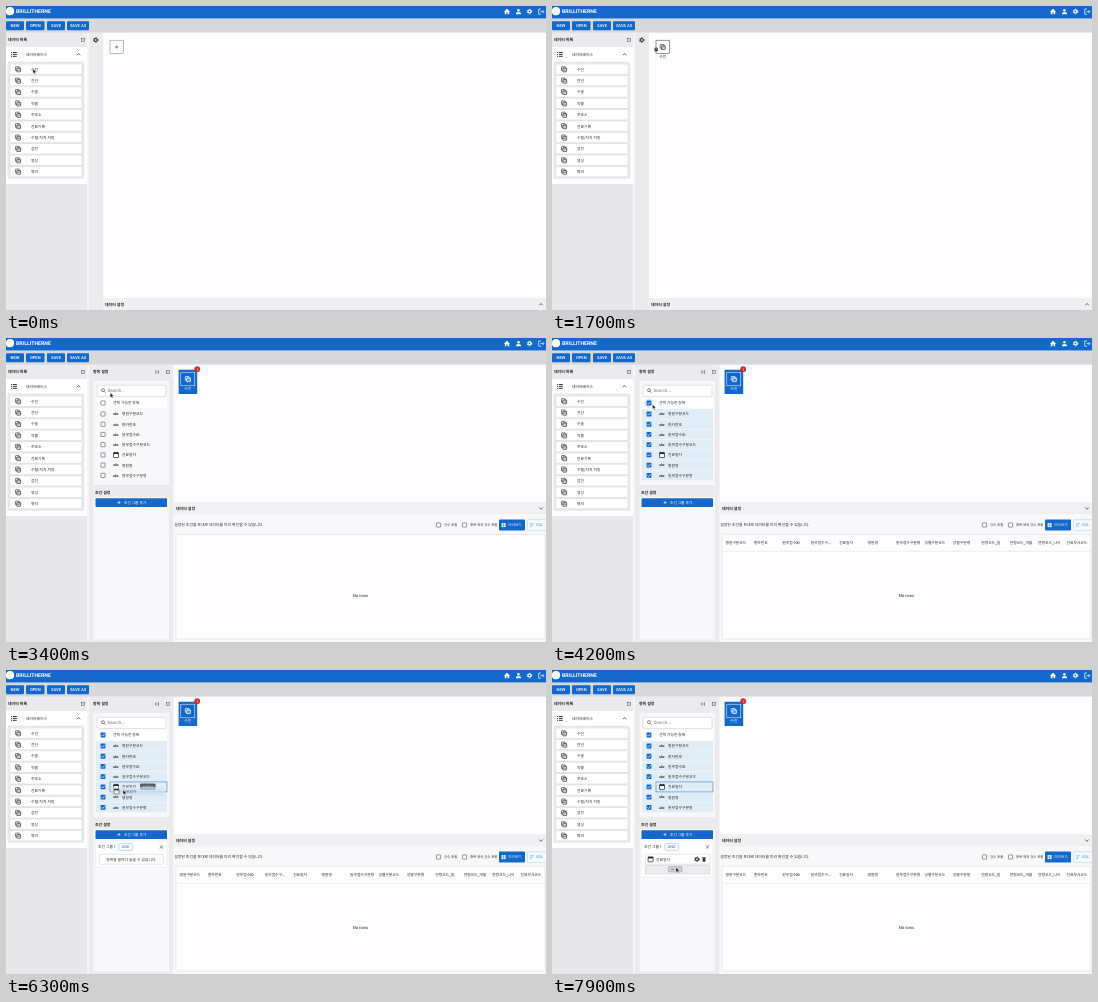
An HTML page that plays this animation: 540x304 px, repeating every 8000 ms.

```html
<!DOCTYPE html>
<html lang="ko">
<head>
<meta charset="utf-8">
<style>
html, body { margin: 0; width: 100%; height: 100%; overflow: hidden; background: #fdfcfe; }
svg { display: block; width: 100%; height: 100%; }
text { font-family: Roboto, "Noto Sans CJK KR", "Noto Sans CJK", sans-serif; text-rendering: geometricPrecision; white-space: pre; }
</style>
</head>
<body>
<svg id="stage" viewBox="0 0 540 304"></svg>
<script>
const BLUE = '#1468cc', INK = '#2b2b2e', GRAY = '#ebebed', PALE = '#e1edf6', WHITE = '#fdfcfe';
const LOOP = 8000;

// Drawing helpers
const box = (x, y, w, h, fill, line = 'none', r = 0, sw = .5) =>
  `<rect x="${x}" y="${y}" width="${w}" height="${h}" rx="${r}" fill="${fill}" stroke="${line}" stroke-width="${sw}"/>`;
const dot = (x, y, r, fill) => `<circle cx="${x}" cy="${y}" r="${r}" fill="${fill}"/>`;
const stroke = (d, color = INK, w = .7) =>
  `<path d="${d}" fill="none" stroke="${color}" stroke-width="${w}"/>`;
const label = (x, y, s, size = 3.8, fill = INK, weight = 400, anchor = 'start') =>
  `<text x="${x}" y="${y + size * .37}" font-size="${size}" fill="${fill}" font-weight="${weight}" text-anchor="${anchor}">${s}</text>`;
const title = (x, y, s) => label(x, y, s, 3.95, '#222', 700);
const group = (id, body, hidden) => `<g id="${id}"${hidden ? ' display="none"' : ''}>${body}</g>`;

// Icons, centred on x, y
const stack = (x, y, c = '#444', bg = '#fff') =>
  box(x - 2.5, y - 2.5, 3.8, 3.8, bg, c, .4, .7) + box(x - 1.2, y - 1.2, 3.8, 3.8, bg, c, .4, .8) +
  stroke(`M${x - 1} ${y - .4}h3.4M${x - 1} ${y + 1}h3.4`, c, .5);
const gear = (x, y, c, hole) =>
  `<circle cx="${x}" cy="${y}" r="2.3" fill="none" stroke="${c}" stroke-width="1" stroke-dasharray="1.2 1.2"/>` +
  dot(x, y, 2, c) + dot(x, y, .9, hole);
const chevron = (x, y, up) => stroke(`M${x - 1.7} ${y + up * .9}l1.7 ${-up * 1.8}l1.7 ${up * 1.8}`, INK, .7);
const plus = (x, y, r, c, w = .6) => stroke(`M${x - r} ${y}h${2 * r}M${x} ${y - r}v${2 * r}`, c, w);
const cross = (x, y, r) => stroke(`M${x - r} ${y - r}l${2 * r} ${2 * r}m0 ${-2 * r}l${-2 * r} ${2 * r}`, '#444', .6);
const expand = (x, y) =>
  box(x - 1.6, y - 1.6, 3.2, 3.2, 'none', '#666', 0, .6) + box(x - .5, y - .5, 1, 1, '#aaa');
const calendar = (x, y) =>
  box(x - 2.5, y - 2.2, 5, 4.8, '#fff', '#222', .4, .7) + box(x - 2.5, y - 2.4, 5, 1.5, '#222') +
  stroke(`M${x - 1.5} ${y - 3.1}v1M${x + 1.5} ${y - 3.1}v1`, '#222', .6);
const trash = (x, y) => box(x - 1.4, y - 1.2, 2.8, 3.7, '#333', 'none', .4) + box(x - 1.9, y - 2.3, 3.8, .7, '#333');
const check = (x, y, on, s = 4.2) => on
  ? box(x - 2.4, y - 2.4, 4.8, 4.8, BLUE, 'none', .6) + stroke(`M${x - 1.5} ${y}l1.1 1.1l2-2.2`, '#fff', .7)
  : box(x - s / 2, y - s / 2, s, s, 'none', '#555', .5, .6);

const SOURCES = ['수진', '진단', '수술', '약물', '주호소', '진료기록', '수혈/처치 처방', '검진', '영상', '병리'];
const FIELDS = ['병원구분코드', '환자번호', '원무접수ID', '원무접수구분코드', '진료일자', '병원명', '원무접수구분명'];
const COLUMNS = ['병원구분코드', '환자번호', '원무접수ID', '원무접수구…', '진료일자', '병원명', '원무접수구분명',
  '성별구분코드', '성별구분명', '연령코드_일', '연령코드_개월', '연령코드_나이', '진료부서코드'];
const fieldY = i => 76 + i * 10.23;
const DATE_Y = fieldY(4);

function header() {
  const tools = [['NEW', 0, 18], ['OPEN', 20, 18.5], ['SAVE', 41, 18], ['SAVE AS', 61, 22]];
  return box(0, 0, 540, 12.7, BLUE) + dot(4, 5.2, 4.1, '#fff') +
    label(10, 5.4, 'BRILLITHERNE', 5.2, '#fff', 700) +
    `<path d="M501 2.8l3.2 2.9h-1v2.6h-1.6v-1.9h-1.2v1.9h-1.6V5.700h-1z" fill="#fff"/>` +
    dot(512.5, 4.2, 1.3, '#fff') + `<path d="M509.900 8.200q0-2.300 2.600-2.300t2.600 2.300z" fill="#fff"/>` +
    gear(523.5, 5.5, '#fff', BLUE) +
    stroke('M535 3h-2.300v5.200h2.300M534.500 5.600h3.300m-1.300-1.500l1.500 1.500l-1.500 1.500', '#fff', .7) +
    box(0, 12.7, 540, 13.9, '#d8d8da') +
    tools.map(([s, x, w]) => box(x, 15.2, w, 9, BLUE, 'none', 1) +
      label(x + w / 2, 19.7, s, 4.1, '#fff', 500, 'middle')).join('');
}

function sidebar() {
  return box(0, 26.6, 83, 278, '#e8e8eb') + box(81, 26.6, 2, 278, '#f5f5f7') +
    box(0, 26.6, 81, 14.4, GRAY) + title(2, 33.7, '데이터 목록') + expand(77, 34) +
    box(0, 41, 81, 137, '#fff') +
    stroke('M5 46.500h1m.8 0h4M5 48.400h1m.8 0h4M5 50.300h1m.8 0h4', '#222', .9) +
    label(20, 48.4, '데이터베이스') + chevron(72.5, 48.4, 1) +
    box(2, 56.2, 75.6, 116, '#f1f1f3', '#c9c9cc', .5) +
    SOURCES.map((s, i) => {
      const y = 63.2 + i * 11.38;
      return box(3.8, y - 5.2, 72.2, 10.4, '#fff', '#cfcfd2', .4) + stack(12, y) + label(25, y, s);
    }).join('');
}

function fieldRows(on) {
  return check(97, 65, on) + FIELDS.map((s, i) => {
    const y = fieldY(i);
    return (on ? box(90, y - 4.9, 71, 9.8, PALE) : '') + check(97, y, on) +
      (i === 4 ? calendar(110, y) : label(107, y, 'abc', 3.5, '#333', 700)) + label(116, y, s);
  }).join('');
}

function settings() {
  return box(83, 26.6, 85, 278, GRAY) + group('shut', gear(89.7, 34, '#333', GRAY)) +
    group('open',
      title(87, 33.7, '항목 설정') + expand(162, 34) +
      stroke('M149.800 32.200v3.600M152.500 32.200v3.600M151.900 34h-1.500', '#555', .6) +
      box(87.5, 43, 75.5, 104, '#f8f8fa') +
      box(91, 47.2, 69, 11.2, '#fff', '#c4c4c8', 1.4) +
      `<circle cx="97" cy="52.200" r="1.500" fill="none" stroke="#555" stroke-width=".7"/>` + stroke('M98.100 53.300l1.500 1.500', '#555') +
      label(101.5, 52.8, 'Search...', 4.5, '#777') +
      box(90, 60, 71, 10.5, '#fff') + group('halo', dot(97, 65, 5, '#e4edf6'), 1) +
      group('off', fieldRows(false)) + group('on', fieldRows(true), 1) +
      label(107, 65, '선택 가능한 항목') +
      group('focus', box(104, DATE_Y - 5, 57, 10, 'none', '#3b7fc9', 0, .6), 1) +
      group('tip', box(134, 113.6, 15.6, 6.5, '#555b63', 'none', 1) + label(141.8, 116.9, '진료일자', 2.9, '#fff', 400, 'middle'), 1) +
      title(89, 155, '조건 설정') + box(87.5, 159, 75.5, 142.5, '#f8f8fa') +
      box(89.5, 160.2, 71.5, 8.8, BLUE, 'none', .8) +
      group('hover', box(89.5, 160.2, 71.5, 8.8, '#1157ac', 'none', .8), 1) +
      `<clipPath id="btn">${box(89.5, 160.2, 71.5, 8.8, '#000', 'none', .8)}</clipPath>` +
      `<g clip-path="url(#btn)"><circle id="ripple" cx="113" cy="166" r="0" fill="#fff"/></g>` +
      plus(113, 164.5, 1.5, '#fff') + label(118, 164.6, '조건 그룹 추가', 3.7, '#fff', 500) +
      group('cond', condition(), 1), 1);
}

function condition() {
  return group('card', box(89.5, 171, 71.5, 26, '#fff', '#e6e6e9', .6)) +
    group('tall', box(89.5, 171, 71.5, 36, '#fff', '#e6e6e9', .6), 1) +
    label(92, 177, '조건 그룹 1') +
    box(113, 173.6, 13.5, 6.7, '#fff', '#7fb0e6', .8) + label(119.7, 177, 'AND', 3.8, BLUE, 400, 'middle') +
    cross(155.4, 177, 1.7) +
    group('hint', box(93.3, 184.2, 64, 10, '#fff', '#c9c9cc', .5) +
      label(125.3, 189.2, '항목을 끌어다 놓을 수 있습니다.', 3.8, INK, 400, 'middle')) +
    group('item', box(93.3, 184.2, 64.5, 10, '#fff', '#c9c9cc', .5) + calendar(98.6, 189.3) +
      label(104, 189.3, '진료일자') + gear(145, 189.3, '#333', '#fff') + trash(152, 189.3) +
      box(93.3, 195.4, 64.5, 8.6, '#ececee', '#c4c4c8', .5) +
      box(116.5, 196.8, 13.5, 5, '#d2d2d4', '#8d8d90', .6) + stroke('M119 199.500h3', '#666', .6), 1);
}

// The workspace sits at its final place and slides in from the left.
function workspace() {
  const tableHead = COLUMNS.map((s, i) => label(173.5 + i * 28.42, 204.4, s, 3.75, INK, 500)).join('');
  return box(167.5, 26.6, 460, 278, WHITE) +
    group('empty', box(174.5, 34.2, 13.4, 13.4, '#fff', '#777') + plus(181.2, 41, 1.7, '#444')) +
    group('placed', box(174.5, 34.2, 13.4, 13.4, '#fff', '#333') + stack(181.2, 41) +
      label(181.2, 50.8, '수진', 3.8, INK, 400, 'middle'), 1) +
    group('picked', box(172.6, 31.8, 18.6, 24.2, BLUE, 'none', .6) +
      box(174.8, 34.2, 14, 13.6, 'none', '#fff') + stack(181.8, 41, '#fff', BLUE) +
      label(181.8, 51, '수진', 3.8, '#fff', 400, 'middle') +
      dot(191.2, 31.2, 2.9, '#d32f2f') + label(191.2, 31.2, '!', 3.6, '#fff', 700, 'middle'), 1) +
    group('add', dot(181.8, 60, 2.8, BLUE) + plus(181.8, 60, 1.3, '#fff'), 1) +
    group('bar', box(167.5, 292, 460, 12, '#f0f0f2') + title(169.5, 298.3, '데이터 설정') + chevron(605.5, 298.3, 1)) +
    group('data',
      box(167.5, 164.5, 376, 140, '#f8f8fa') + box(167.5, 164.5, 376, 11.8, '#f0f0f2') +
      title(170, 170.4, '데이터 설정') + chevron(535, 170.4, -1) +
      label(168.3, 187, '설정된 조건을 토대로 데이터를 미리 확인할 수 있습니다.', 3.85) +
      check(432.5, 187, false) + label(438, 187, '건수 포함', 3.4) +
      check(458.5, 187, false) + label(464, 187, '중복 제외 건수 포함', 3.4) +
      box(493, 181.6, 26, 10.9, BLUE, 'none', .9) + box(495.6, 185.1, 4, 4, '#fff') +
      stroke('M495.600 187.100h4M497.600 185.100v4', BLUE, .5) + label(502.3, 187, '미리보기', 3.6, '#fff', 500) +
      box(521.4, 181.6, 20, 10.9, '#f4f9fe', '#a9cdf0', .9) +
      stroke('M524 185.700h4M524 187.200h3M524 188.700h2', '#6ba9e6', .6) + label(530, 187, 'SQL', 3.9, '#6ba9e6', 500) +
      box(170, 196.3, 369, 104.7, WHITE, '#d8d8dc', .6) +
      group('heads', tableHead + stroke('M170 213.300h369', '#dedee2', .5), 1) +
      group('none', label(354.5, 257, 'No rows', 4.2, INK, 400, 'middle'), 1) +
      `<rect id="cover" x="167" width="460" height="130" fill="${WHITE}"/>`, 1);
}

const stage = document.getElementById('stage');
stage.innerHTML = settings() + group('main', workspace()) + sidebar() + header() +
  group('drag1', box(3.8, 58, 72.2, 10.4, '#fff', '#cfcfd2', .4) + stack(12, 63.2) + label(25, 63.2, '수진'), 1) +
  group('drag2', box(104, DATE_Y - 4.5, 54, 9, '#cfe2f3') + calendar(110, DATE_Y) + label(116, DATE_Y, '진료일자'), 1) +
  group('cursor', group('arrow', '<path d="M0 0v4.600l1.100-1l.8 1.700l.8-.4l-.8-1.600h1.500z" fill="#111" stroke="#fff" stroke-width=".35"/>') +
    group('hand', box(-1.3, -1.2, 3, 3.4, '#444', '#222', 1.2, .4) + stroke('M-.4-1v1.500M.6-1v1.500', '#ddd', .3), 1));

const el = {};
for (const n of stage.querySelectorAll('[id]')) el[n.id] = n;

// time, x, y
const PATH = [[0, 27, 63], [500, 27, 63], [1300, 106, 43], [1500, 104, 43], [2000, 104, 43], [2400, 108, 43],
  [3000, 108, 43], [3800, 100.5, 66.5], [4250, 100.5, 66.5], [4750, 113, 166], [5550, 113, 166],
  [6050, 116.5, 115.5], [6200, 116.5, 115.5], [6850, 125, 184.3], [7300, 125, 185], [7700, 124, 197.5], [8000, 124, 197.5]];

// id, from, to
const SPANS = [['empty', 0, 1500], ['placed', 1500, 2500], ['picked', 2500, LOOP], ['add', 2400, 3100],
  ['shut', 0, 2600], ['open', 2600, LOOP], ['bar', 0, 2600], ['data', 2600, LOOP], ['none', 2900, LOOP],
  ['off', 0, 4000], ['on', 4000, LOOP], ['halo', 3700, 4300], ['heads', 4100, LOOP],
  ['hover', 4700, 5700], ['cond', 5400, LOOP], ['card', 0, 7300], ['tall', 7300, LOOP],
  ['hint', 0, 7300], ['item', 7300, LOOP], ['focus', 6150, LOOP], ['tip', 6050, 7300],
  ['drag1', 600, 1500], ['drag2', 6250, 7300], ['hand', 1500, 2200]];

const ramp = (t, a, b) => Math.min(1, Math.max(0, (t - a) / (b - a)));
const ease = k => k * k * (3 - 2 * k);
const move = (n, x, y) => n.setAttribute('transform', `translate(${x} ${y})`);

function pointer(t) {
  const i = PATH.findIndex(p => p[0] > t);
  const [t0, x0, y0] = PATH[i - 1], [t1, x1, y1] = PATH[i];
  const k = ease(ramp(t, t0, t1));
  return [x0 + (x1 - x0) * k, y0 + (y1 - y0) * k];
}

function draw(t) {
  for (const [id, a, b] of SPANS) el[id].setAttribute('display', t >= a && t < b ? 'inline' : 'none');
  el.arrow.setAttribute('display', t >= 1500 && t < 2200 ? 'none' : 'inline');

  const [x, y] = pointer(t);
  move(el.cursor, x, y);
  move(el.drag1, x - 27, y - 63);
  move(el.drag2, x - 116.5, y - 115.5);
  el.drag1.setAttribute('opacity', .65);
  el.drag2.setAttribute('opacity', .7);

  const p = ease(ramp(t, 2610, 2800));
  move(el.main, -70.5 * (1 - p), 0);
  el.cover.setAttribute('y', 180 + 125 * p);

  el.ripple.setAttribute('r', t < 5350 ? 0 : 75 * ramp(t, 5350, 5750));
  el.ripple.setAttribute('opacity', .22 * (1 - ramp(t, 5550, 5900)));
}

function tick() {
  draw(performance.now() % LOOP);
  requestAnimationFrame(tick);
}
tick();
</script>
</body>
</html>
```
